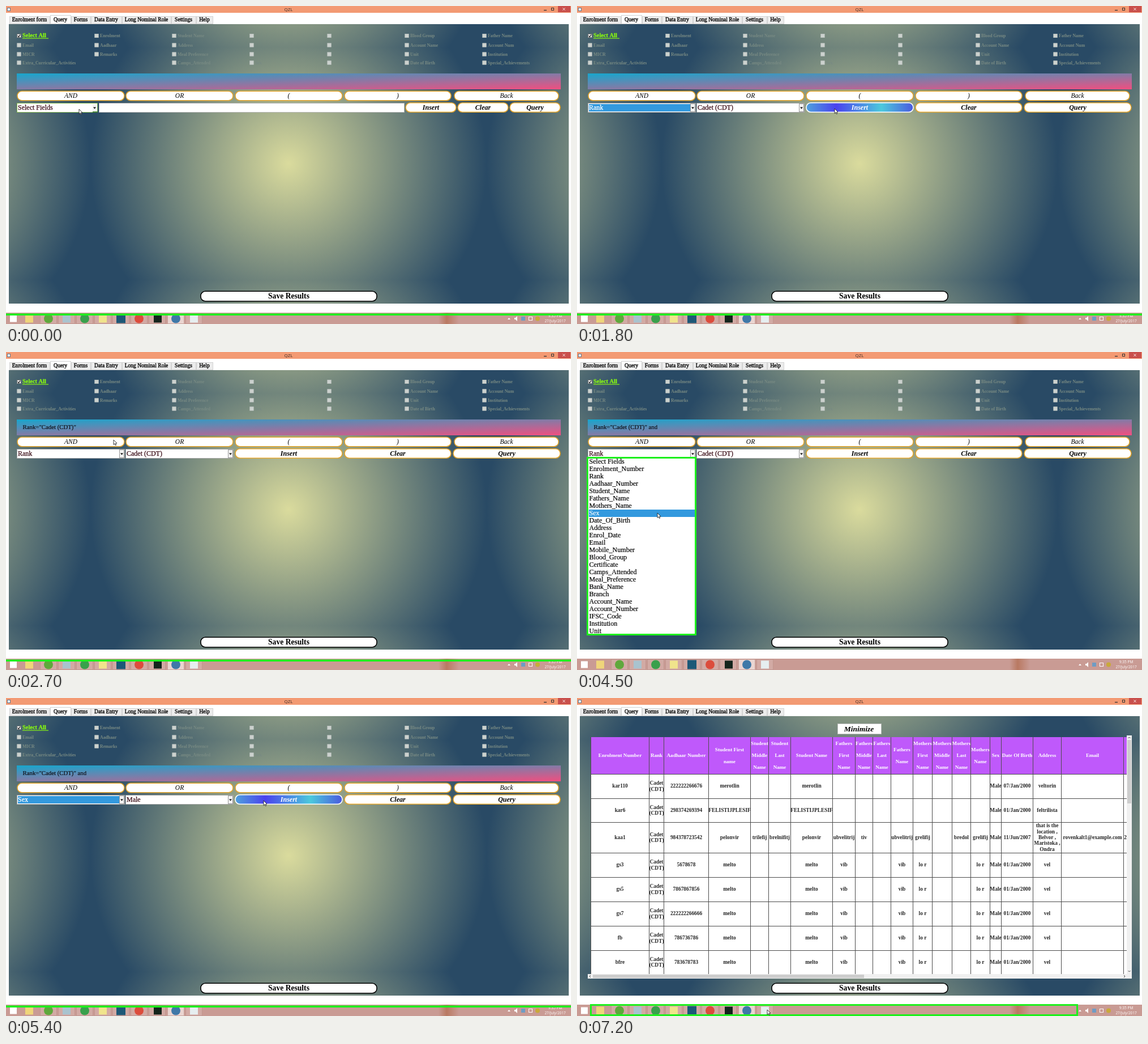
These frames come from a looping animation (998x561 px, 9200 ms). An HTML page with a canvas:

```html
<!DOCTYPE html>
<html lang="en">
<head>
<meta charset="utf-8">
<title>Query demo</title>
<style>
html, body { margin: 0; width: 100%; height: 100%; overflow: hidden; background: #fff; }
canvas { display: block; }
</style>
</head>
<body>
<canvas id="stage" width="998" height="561"></canvas>
<script>
const ctx = document.getElementById('stage').getContext('2d');
const SERIF = '"Liberation Serif", serif', SANS = '"Open Sans", sans-serif';
const GREEN = '#1df01d', BLUE = '#3399de', MAROON = '#3a0c16';
const STEP = 900, LOOP = 9200;

const FIELDS = ('Select Fields,Enrolment_Number,Rank,Aadhaar_Number,Student_Name,Fathers_Name,Mothers_Name,' +
  'Sex,Date_Of_Birth,Address,Enrol_Date,Email,Mobile_Number,Blood_Group,Certificate,Camps_Attended,' +
  'Meal_Preference,Bank_Name,Branch,Account_Name,Account_Number,IFSC_Code,Institution,Unit').split(',');
const CHECKS = [
  ['', 'Enrolment', 'Student Name', ' ', ' ', 'Blood Group', 'Father Name'],
  ['Email', 'Aadhaar', 'Address', ' ', ' ', 'Account Name', 'Account Num'],
  ['MICR', 'Remarks', 'Meal Preference', ' ', ' ', 'Unit', 'Institution'],
  ['Extra_Curricular_Activities', null, 'Camps_Attended', 'Sex', ' ', 'Date of Birth', 'Special_Achievements']
];
const INSERT_HOVER = [[0, '#4fa3dd'], [.28, '#4a42ee'], [.7, '#4cc9dc'], [1, '#4a58e0']];
const QUERY_HOVER = [[0, '#0a3a10'], [.1, '#0d5212'], [.21, '#2f8a22'], [.29, '#8b7a45'], [.42, '#c75a42'],
  [.53, '#9a5a62'], [.66, '#7868ea'], [.84, '#86d5d8'], [.93, '#9aae82'], [1, '#6f9226']];

// One entry per step; `list` is the highlighted row of the open drop-down.
const CADET = 'Rank="Cadet (CDT)"';
const STATES = [
  { field: 'Select Fields', hover: 'field', cursor: [129, 182] },
  { field: 'Select Fields', list: 2, cursor: [92, 217] },
  { field: 'Rank', value: 'Cadet (CDT)', focus: true, hover: 'Insert', cursor: [455, 181] },
  { field: 'Rank', value: 'Cadet (CDT)', query: CADET, cursor: [190, 155] },
  { field: 'Rank', value: 'Cadet (CDT)', query: CADET + ' and', hover: 'field', click: [192, 157], cursor: [175, 184] },
  { field: 'Rank', value: 'Cadet (CDT)', query: CADET + ' and', list: 7, cursor: [142, 284] },
  { field: 'Sex', value: 'Male', query: CADET + ' and', focus: true, hover: 'Insert', cursor: [455, 181] },
  { field: 'Sex', value: 'Male', query: CADET + ' and Sex="Male"', hover: 'Query', cursor: [845, 178] },
  { results: true, cursor: [336, 550] }
];

const COLUMNS = [24, 127, 153, 232, 306, 338, 377, 451, 491, 522, 554, 593, 627, 662, 695, 729, 749, 805, 855, 965, 971];
const ROWS = [134, 177, 219, 273, 316, 359, 402, 445, 487];
const HEADS = ('Enrolment Number,Rank,Aadhaar Number,Student First|name,Student|Middle|Name,Student|Last|Name,Student Name,' +
  'Fathers|First|Name,Fathers|Middle|Name,Fathers|Last|Name,Fathers|Name,Mothers|First|Name,Mothers|Middle|Name,' +
  'Mothers|Last|Name,Mothers|Name,Sex,Date Of Birth,Address,Email').split(',');
const common = { 3: 'melto', 6: 'melto', 7: 'vib', 10: 'vib', 11: 'lo r', 14: 'lo r', 17: 'vel' };
const RECORDS = [
  { 0: 'kar110', 2: '222222266676', 3: 'merotlin', 6: 'merotlin', 16: '07/Jan/2000', 17: 'veltorin' },
  { 0: 'kar6', 2: '298374269394', 3: 'FELISTIJPLESIF', 6: 'FELISTIJPLESIF', 17: 'feltrilista' },
  { 0: 'kaa1', 2: '984378723542', 3: 'pelonvir', 4: 'trilefij', 5: 'brelnifitj', 6: 'pelonvir', 7: 'ubvelitrij', 8: 'tiv',
    10: 'ubvelitrij', 11: 'grelifij', 13: 'bredol', 14: 'grelifij', 16: '11/Jun/2007',
    17: 'that is the|location ,|Belvor ,|Maristoka ,|Ondra', 18: 'rovenkalt1@example.com', 19: '2' },
  { ...common, 0: 'gs3', 2: '5678678' },
  { ...common, 0: 'gs5', 2: '7867867856' },
  { ...common, 0: 'gs7', 2: '222222266666' },
  { ...common, 0: 'fb', 2: '786736786' },
  { ...common, 0: 'bfre', 2: '783678783' }
];

function rect(x1, y1, x2, y2, fill) {
  ctx.fillStyle = fill;
  ctx.fillRect(x1, y1, x2 - x1, y2 - y1);
}

function frame(x1, y1, x2, y2, color, width = 1) {
  ctx.strokeStyle = color;
  ctx.lineWidth = width;
  ctx.strokeRect(x1 + width / 2, y1 + width / 2, x2 - x1 - width, y2 - y1 - width);
}

function circle(x, y, r, fill) {
  ctx.fillStyle = fill;
  ctx.beginPath();
  ctx.arc(x, y, r, 0, 7);
  ctx.fill();
}

function path(points, color, width = 1) {
  ctx.beginPath();
  points.forEach(([x, y]) => ctx.lineTo(x, y));
  ctx.strokeStyle = color;
  ctx.lineWidth = width;
  ctx.stroke();
}

function polygon(points, fill) {
  ctx.beginPath();
  points.forEach(([x, y]) => ctx.lineTo(x, y));
  ctx.closePath();
  ctx.fillStyle = fill;
  ctx.fill();
}

function text(str, x, y, size, { color = '#000', style = '', align = 'left', family = SERIF, heavy = 0 } = {}) {
  ctx.font = `${style} ${size}px ${family}`;
  ctx.textAlign = align;
  ctx.textBaseline = 'middle';
  ctx.fillStyle = ctx.strokeStyle = color;
  ctx.fillText(str, x, y);
  if (heavy) {
    ctx.lineWidth = heavy;
    ctx.strokeText(str, x, y);
  }
}

function lines(str, x, y, gap, size, options) {
  const parts = str.split('|');
  parts.forEach((part, i) =>
    text(part, x, y + (i - (parts.length - 1) / 2) * gap, size, { style: 'bold', align: 'center', ...options }));
}

function linear(x1, x2, stops) {
  const gradient = ctx.createLinearGradient(x1, 0, x2, 0);
  stops.forEach(stop => gradient.addColorStop(...stop));
  return gradient;
}

function pill(label, x1, y1, x2, y2, size, style, { hover, border = '#e3a52c' } = {}) {
  ctx.beginPath();
  ctx.roundRect(x1 + 1, y1 + .8, x2 - x1 - 2, y2 - y1 - 1.6, 8);
  ctx.fillStyle = hover ? linear(x1, x2, hover) : '#fff';
  ctx.fill();
  ctx.strokeStyle = hover ? '#fff' : border;
  ctx.lineWidth = 1.6;
  ctx.stroke();
  text(label, (x1 + x2) / 2, (y1 + y2) / 2 + .5, size, { style, align: 'center', color: hover ? '#fff' : '#000' });
}

function combo(label, x1, x2, { focus, hover } = {}) {
  rect(x1, 171, x2, 188, '#fff');
  frame(x1, 171, x2, 188, hover ? '#86bb52' : '#a8a8a8');
  if (focus) rect(x1 + 2, 173, x2 - 10, 186, BLUE);
  rect(x2 - 10, 172, x2 - 1, 187, '#f2f2f2');
  frame(x2 - 10, 172, x2 - 1, 187, hover ? '#fff' : '#999');
  if (hover) rect(x2 - 9, 186, x2, 188, '#4c8a3a');
  polygon([[x2 - 8, 178.5], [x2 - 3, 178.5], [x2 - 5.5, 181.5]], '#000');
  text(label, x1 + 2, 179.5, 12, { color: focus ? '#fff' : MAROON, heavy: .25 });
}

// The glow is one 700 x 410 tile, repeated around the centre.
function drawBackdrop() {
  ctx.save();
  ctx.beginPath();
  ctx.rect(5, 32, 989, 493);
  ctx.clip();
  const glow = ctx.createRadialGradient(0, 0, 0, 0, 0, 350);
  glow.addColorStop(0, '#dadb9d');
  glow.addColorStop(1, '#294a65');
  for (const col of [-1, 0, 1]) {
    for (const row of [-1, 0, 1]) {
      ctx.setTransform(1, 0, 0, 1, 499 + col * 700, 278 + row * 410);
      rect(-350, -205, 350, 205, glow);
    }
  }
  ctx.restore();
}

function drawWindow() {
  rect(0, 0, 998, 561, '#fff');
  rect(0, 0, 998, 12, '#f39a73');
  rect(2, 3, 8, 9, '#f4f6f8');
  frame(2, 3, 8, 9, '#5d7890');
  text('QZL', 499, 6.5, 8, { align: 'center', family: SANS, color: '#3a2a24' });
  path([[950, 7.5], [955, 7.5]], '#333', 1.3);
  frame(963, 3, 968, 8, '#333');
  rect(975, 0, 997, 11, '#c9504c');
  path([[983.5, 3.5], [987.5, 7.5]], '#fff');
  path([[987.5, 3.5], [983.5, 7.5]], '#fff');

  [['Enrolment form', 6, 77], ['Query', 78, 114], ['Forms', 115, 149], ['Data Entry', 150, 204],
   ['Long Nominal Role', 205, 291], ['Settings', 292, 335], ['Help', 336, 365]].forEach(([name, x1, x2]) => {
    const active = name === 'Query';
    rect(x1, active ? 16 : 18, x2, 32, active ? '#fff' : '#ececec');
    frame(x1, active ? 16 : 18, x2 + 1, 32, '#d2d2d2');
    text(name, (x1 + x2) / 2, 24.5, 9.6, { align: 'center', heavy: .35 });
  });
  drawBackdrop();
}

function drawForm(state) {
  CHECKS.forEach((row, r) => row.forEach((label, c) => {
    if (label === null) return;
    const x = 23 + c * 137, y = [52.5, 69, 85, 100][r];
    const first = !r && !c;
    rect(x - 3.5, y - 3.5, x + 3.5, y + 3.5, first ? '#fff' : '#cdd2cf');
    frame(x - 3.5, y - 3.5, x + 3.5, y + 3.5, first ? '#444' : '#b4bcb8', .7);
    text(label, x + 6, y + .5, 7.8, { style: 'bold', color: '#788a83' });
  }));
  path([[21, 52.5], [22.5, 54.5], [25, 50.5]], '#000', 1.2);
  text('Select All', 29, 52.5, 10.4, { style: 'bold', color: '#86f512', heavy: .3 });
  rect(29, 56.5, 75, 57.7, '#86f512');

  ctx.save();
  ctx.translate(19, 119);
  ctx.scale(961, 28);
  const bar = ctx.createLinearGradient(0, 0, 1, 1);
  bar.addColorStop(0, '#17a6cd');
  bar.addColorStop(1, '#f04f80');
  ctx.fillStyle = bar;
  ctx.fillRect(0, 0, 1, 1);
  ctx.restore();
  text(state.query || '', 29.5, 133.5, 10.8, { color: '#101018', heavy: .2 });

  [['AND', 19, 210], ['OR', 211, 402], ['(', 404, 595], [')', 597, 787], ['Back', 791, 977]].forEach(([label, x1, x2]) =>
    pill(label, x1, 149.5, x2, 167.5, 11.5, 'italic'));
  if (state.click) {
    circle(...state.click, 2.2, '#e88');
    circle(...state.click, 1, '#fcc');
  }

  const split = Boolean(state.value);
  const right = split ? 210 : 162;
  combo(state.field, 19, right, { focus: state.focus, hover: state.hover === 'field' });
  if (split) combo(state.value, 211, 402);
  else {
    rect(164, 171, 704, 188, '#fff');
    frame(164, 171, 704, 188, '#b4b4b4');
  }
  const edges = split ? [[404, 595], [597, 787], [789, 980]] : [[705, 796], [797, 888], [889, 980]];
  ['Insert', 'Clear', 'Query'].forEach((label, i) => {
    const hover = state.hover === label && (i ? QUERY_HOVER : INSERT_HOVER);
    pill(label, edges[i][0], 170, edges[i][1], 188, 12, 'italic bold', { hover });
  });

  if (state.list) {
    rect(18, 186, right, 500, '#fff');
    FIELDS.forEach((name, i) => {
      const y = 194 + i * 13, active = i === state.list;
      if (active) rect(21, y - 7, right - 2, y + 6, BLUE);
      text(name, 21.5, y, 12.1, { color: active ? '#fff' : '#000', heavy: .2 });
    });
    frame(17, 185, right + 1, 500, GREEN, 3);
  }
}

function drawResults() {
  rect(460, 45, 538, 64, '#fff');
  frame(460, 45, 538, 64, '#bbb');
  text('Minimize', 498, 55.5, 13.5, { style: 'italic bold', align: 'center' });

  rect(24, 69, 971, 487, '#fff');
  rect(24, 69, 971, 134, '#bf59fb');
  ctx.save();
  ctx.beginPath();
  ctx.rect(24, 69, 947, 418);
  ctx.clip();
  const middle = c => (COLUMNS[c] + COLUMNS[c + 1]) / 2;
  HEADS.forEach((head, c) => lines(head, middle(c) + .5, 102, 21, 9.1, { color: '#fff' }));
  RECORDS.forEach((record, r) => {
    const cells = { 1: 'Cadet|(CDT)', 15: 'Male', 16: '01/Jan/2000', ...record };
    const y = (ROWS[r] + ROWS[r + 1]) / 2 + .5;
    Object.keys(cells).forEach(c => lines(cells[c], middle(+c) + .5, y, 10.4, 9.4, { color: '#262626' }));
  });
  COLUMNS.slice(0, -1).forEach(x => rect(x, 69, x + 1, 487, '#4c4c4c'));
  ROWS.slice(0, -1).forEach(y => rect(24, y, 971, y + 1, '#4c4c4c'));
  ctx.restore();

  rect(971, 66, 980, 487, '#f0f0f0');
  rect(972, 74, 979, 186, '#cdcdcd');
  rect(19, 487, 980, 495, '#f0f0f0');
  rect(28, 488, 507, 494, '#cdcdcd');
  path([[973.5, 71], [975.5, 69], [977.5, 71]], '#444');
  path([[973.5, 481], [975.5, 483], [977.5, 481]], '#444');
  path([[24, 489], [22, 491], [24, 493]], '#444');
  path([[966, 489], [968, 491], [966, 493]], '#444');
}

function drawTaskbar(state) {
  rect(0, 541, 998, 561, '#c99b94');
  ctx.fillStyle = linear(764, 800, [[0, '#b9796200'], [.4, '#b97962'], [1, '#b9796200']]);
  ctx.fillRect(764, 541, 36, 20);
  [60, 92, 124, 156, 188, 220, 252, 285, 317].forEach((x, i) => {
    rect(x, 542, x + 30, 561, i === 7 ? '#ead5d1' : '#d2aaa4');
    frame(x, 542, x + 30, 561, '#b98e87', .7);
  });
  const square = (x, r, fill) => rect(x - r, 551.5 - r, x + r, 551.5 + r, fill);
  square(13, 6, '#fff');
  square(41, 7, '#efd57a');
  circle(75, 551.5, 8, '#5fa83c');
  square(107, 7, '#a9c3cf');
  circle(139, 551.5, 8, '#39a04c');
  square(171, 7, '#f0e48c');
  square(203, 8, '#1d5877');
  circle(235, 551.5, 8, '#dc4c3c');
  square(268, 7, '#14241c');
  circle(300, 551.5, 8, '#3f78a8');
  square(332, 7, '#e6eef0');

  polygon([[886, 553], [891, 553], [888.5, 550]], '#fff');
  polygon([[898, 550], [900, 550], [903, 547], [903, 556], [900, 553], [898, 553]], '#fff');
  rect(910, 548, 917, 555, '#6f9cc4');
  frame(923, 548, 930, 555, '#fff');
  circle(939, 551.5, 4, '#c9a93a');
  const white = { color: '#fff', align: 'center', family: SANS };
  text('9:35 PM', 970, 547.5, 6.6, white);
  text('27/July/2017', 970, 556, 6.4, white);

  if (state.results) frame(23, 540, 885, 561, GREEN, 3);
  else if (!state.list) rect(0, 542.5, 998, 546, GREEN);
}

function drawCursor([x, y]) {
  const arrow = [[0, 0], [0, 8.5], [2, 6.7], [3.4, 9.6], [4.7, 9], [3.4, 6.2], [6, 6]].map(([dx, dy]) => [x + dx, y + dy]);
  polygon(arrow, '#fff');
  path([...arrow, arrow[0]], '#111', .8);
}

function render(now) {
  const step = Math.min(STATES.length - 1, Math.floor(now % LOOP / STEP));
  const state = STATES[step];
  drawWindow();
  pill('Save Results', 343, 502.5, 656, 521.5, 13.6, 'bold', { border: '#000' });
  if (state.results) drawResults();
  else drawForm(state);
  drawTaskbar(state);
  drawCursor(state.cursor);
}

const start = performance.now();
function tick() {
  render(performance.now() - start);
  requestAnimationFrame(tick);
}
tick();
</script>
</body>
</html>
```
